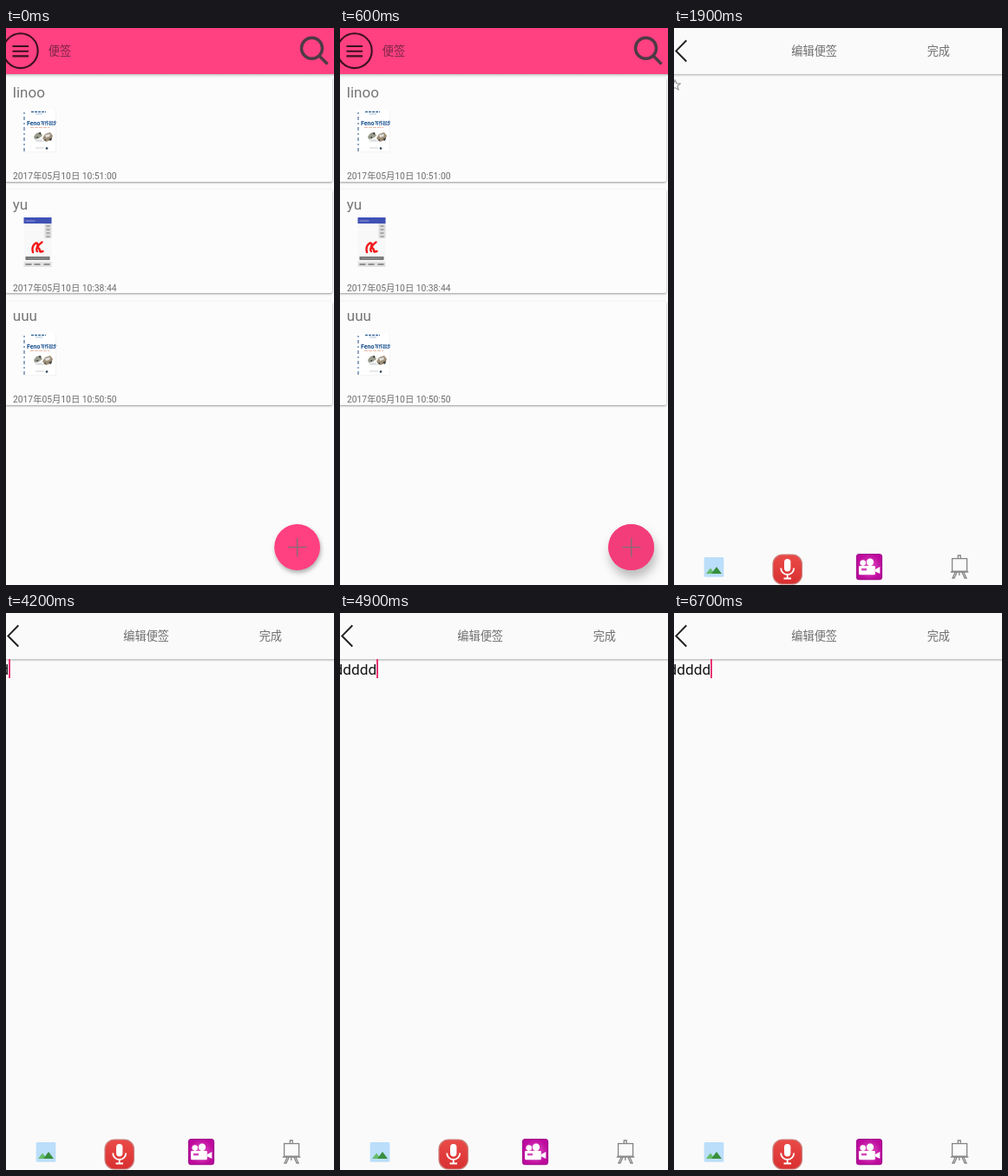
An HTML page that plays this animation: 378x641 px, repeating every 8000 ms.

```html
<!DOCTYPE html>
<html lang="zh-CN">
<head>
<meta charset="utf-8">
<title>便签</title>
<style>
  html, body { margin: 0; width: 100%; height: 100%; overflow: hidden; background: #fafafa; }
  .stage { position: fixed; inset: 0; overflow: clip; contain: strict; }
  svg { position: absolute; left: 0; top: 0; display: block; }
  text, .typed { font-family: Roboto, "Noto Sans CJK SC", "Noto Sans CJK", sans-serif; }
  .title { font-size: 17px; fill: #767676; }
  .date { font-size: 10.3px; fill: #6c6c6c; }
  .bar { font-size: 13.2px; fill: #6e6e6e; }
  .card { fill: #fcfcfc; filter: drop-shadow(0 1px 1px rgba(0, 0, 0, .4)); }

  .fab, .press, .dim, .editor, .hint, .typed { animation: 8s step-end infinite; }
  .fab { animation-name: lift; }
  .press { animation-name: press; }
  .dim { animation-name: dim; }
  .editor { position: absolute; left: 0; top: 0; width: 378px; height: 641px;
    overflow: hidden; background: #fafafa; animation-name: enter; }
  .hint { animation-name: hint; }
  .typed { position: absolute; left: 0; top: 53px; height: 22px; overflow: hidden;
    border-right: 2px solid #e93574; color: #161616; font-size: 17.25px;
    line-height: 24px; white-space: nowrap; animation-name: type, blink; }
  .typed span { margin-left: -6.4px; }

  @keyframes lift {
    0% { filter: drop-shadow(1px 3px 2.5px rgba(0, 0, 0, .3)); }
    6.25% { filter: drop-shadow(1px 5px 4px rgba(0, 0, 0, .28)); }
    7.5%, 100% { filter: drop-shadow(2px 8px 6px rgba(0, 0, 0, .26)); }
  }
  @keyframes press {
    0% { opacity: 0; }
    6.25% { opacity: .5; }
    7.5%, 100% { opacity: 1; }
  }
  @keyframes dim {
    0% { opacity: 0; }
    22.5%, 100% { opacity: .09; }
  }
  @keyframes enter {
    0% { opacity: 0; transform: translateY(14px); }
    22.5% { opacity: .9; transform: translateY(14px); }
    23.75%, 100% { opacity: 1; transform: none; }
  }
  @keyframes hint {
    0% { opacity: 1; }
    52.5%, 100% { opacity: 0; }
  }
  @keyframes type {
    0% { width: 0; visibility: hidden; }
    52.5% { width: 3px; visibility: visible; }
    55% { width: 13px; visibility: visible; }
    56.25% { width: 23px; visibility: visible; }
    58.75% { width: 32px; visibility: visible; }
    61.25%, 100% { width: 42px; visibility: visible; }
  }
  @keyframes blink {
    0%, 73.75%, 83.75%, 100% { border-color: #e93574; }
    66.25%, 78.75% { border-color: transparent; }
  }
</style>
</head>
<body>
<div class="stage">
<svg width="378" height="641" viewBox="0 0 378 641">
  <defs>
    <g id="book">
      <rect width="38" height="49" fill="#fff"/>
      <path d="M1 3V48" stroke="#6484a8" stroke-width="1.4" stroke-dasharray="2 3 4 3"/>
      <path d="M9 2.5H26" stroke="#3f6c9c" stroke-width="1.4" stroke-dasharray="3 1"/>
      <path d="M14 5H22" stroke="#9db6d2" stroke-width=".8"/>
      <g fill="#174f8c" font-weight="700">
        <text x="4" y="17.5" font-size="7">Feno</text>
        <text x="20" y="16.8" font-size="4.7">写作起步</text>
      </g>
      <path d="M8 20.5H30" stroke="#e9b9a8" stroke-width="1" stroke-dasharray="4 1"/>
      <path d="M12 31l3-4 5-1 2 4-4 3-5 1z" fill="#9a9c8e"/>
      <path d="M22 33l3-5 6-2 3 4-2 5-6 2z" fill="#a18f78"/>
      <path d="M13 34h8l3 3h-9zM25 29l6-1-1 3-4 1z" fill="#dfe2e2"/>
      <path d="M17 27l3-1v3zM29 34l4-2-1 4zM14 32l3-1v2zM23 35l3-1v2z" fill="#3a4240"/>
      <path d="M14 44H24" stroke="#c9cdd2" stroke-width=".9"/>
      <circle cx="27" cy="44.5" r="1.3" fill="#2b3f5c"/>
      <path d="M37.5 0V49M0 48.7H38" stroke="#ececec" stroke-width=".6"/>
    </g>
    <g id="screen">
      <rect width="32" height="57" fill="#f8f8f8"/>
      <rect width="32" height="7" fill="#3f51b5"/>
      <path d="M2 4H13" stroke="#8f9ad6" stroke-width="1"/>
      <rect x="24" y="7" width="8" height="17" fill="#dcdcdc"/>
      <path d="M26 10h4M26 14h4M26 18h4M26 22h4" stroke="#777" stroke-width="1.1"/>
      <path d="M10.5 40Q8.5 33 14 29.5Q17 29 15.5 34Q14 38 15.5 39M21 28.5Q16 32 16 35Q18 35 19 39.5L22 39" fill="none"
        stroke="#f01818" stroke-width="2.4" stroke-linecap="round" stroke-linejoin="round"/>
      <rect x="2" y="45" width="28" height="4" fill="#777"/>
      <path d="M5 47H27" stroke="#aaa" stroke-width=".8" stroke-dasharray="2 1"/>
      <rect y="51" width="32" height="6" fill="#e2e2e2"/>
      <path d="M2 54h7m3 0h7m4 0h7" stroke="#777" stroke-width="1.3"/>
    </g>
    <linearGradient id="shade" x2="0" y2="1">
      <stop stop-color="#bdbdbd"/><stop offset="1" stop-color="#fafafa"/>
    </linearGradient>
    <linearGradient id="red" x2="0" y2="1">
      <stop stop-color="#ea4b48"/><stop offset="1" stop-color="#d92f30"/>
    </linearGradient>
    <radialGradient id="magenta">
      <stop stop-color="#e355c6"/><stop offset="1" stop-color="#bd0a9d"/>
    </radialGradient>
  </defs>

  <rect width="378" height="641" fill="#fbfbfb"/>
  <rect width="378" height="53" fill="#ff4081"/>
  <rect y="53" width="378" height="3" fill="url(#shade)"/>
  <g fill="none" stroke="#38111f" stroke-width="2.1">
    <circle cx="16.8" cy="26.2" r="19.9"/>
    <path d="M7.5 21H26M7.5 26.7H26M7.5 32.4H26"/>
  </g>
  <text class="bar" x="48.8" y="31" style="fill:#7a2545">便签</text>
  <g fill="none" stroke="#4c3b45" stroke-width="3.4">
    <circle cx="352.5" cy="23.3" r="12"/>
    <path d="M361 32L370.5 41.5"/>
  </g>

  <rect class="card" x="-1" y="57" width="377" height="120" rx="2"/>
  <text class="title" x="7.8" y="80">linoo</text>
  <use href="#book" x="20" y="94"/>
  <text class="date" x="8" y="174">2017年05月10日 10:51:00</text>

  <rect class="card" x="-1" y="186" width="377" height="119" rx="2"/>
  <text class="title" x="7.8" y="208.5">yu</text>
  <use href="#screen" x="20.5" y="218"/>
  <text class="date" x="8" y="302.5">2017年05月10日 10:38:44</text>

  <rect class="card" x="-1" y="315" width="377" height="119" rx="2"/>
  <text class="title" x="7.8" y="337">uuu</text>
  <use href="#book" x="20" y="351"/>
  <text class="date" x="8" y="431">2017年05月10日 10:50:50</text>

  <g class="fab">
    <circle cx="335.6" cy="597.5" r="26.4" fill="#ff4081"/>
    <circle class="press" cx="335.6" cy="597.5" r="26.4" fill="#f33d7b"/>
    <path d="M325 597.5H346.5M335.7 587V608.5" stroke="#8f6876" stroke-width="1.6"/>
  </g>
  <rect class="dim" width="378" height="641"/>
</svg>

<div class="editor">
  <svg width="378" height="641" viewBox="0 0 378 641">
    <rect y="53" width="378" height="3" fill="url(#shade)"/>
    <path d="M14.3 14.3L2.4 26.4L14.3 38.5" fill="none" stroke="#222" stroke-width="2"/>
    <text class="bar" x="135.3" y="31.3">编辑便签</text>
    <text class="bar" x="291.7" y="31.3">完成</text>
    <path class="hint" d="M1.3 59.5L2.9 64H7.6L3.9 66.8L5.3 71.3L1.3 68.6L-2.7 71.3L-1.3 66.8L-5 64H-.3Z"
      fill="none" stroke="#777" stroke-width=".9"/>

    <rect x="34.7" y="609" width="22.6" height="22.8" rx="1.5" fill="#bbdefb"/>
    <path d="M37 628L42 621.5L47 628Z" fill="#66bb6a"/>
    <path d="M43 628L49 620L55 628Z" fill="#388e3c"/>

    <rect x="114" y="606" width="33.5" height="34" rx="11" fill="url(#red)" stroke="#c9827f" stroke-width="1.2"/>
    <rect x="127" y="611" width="7.4" height="14.5" rx="3.7" fill="#fff"/>
    <path d="M123.2 621.5a7.5 7.5 0 0 0 15 0M130.7 629V633.5M126.5 633.5H135" fill="none" stroke="#fff" stroke-width="1.8"/>

    <rect x="210.5" y="605.5" width="29" height="29.2" rx="3" fill="url(#magenta)" stroke="#a3108e" stroke-width="1.2"/>
    <g fill="#fff">
      <circle cx="217.7" cy="615.6" r="3.3"/>
      <circle cx="226" cy="614.8" r="4.2"/>
      <rect x="213" y="619" width="18.8" height="10.3" rx="1.2"/>
      <path d="M232 623L237.3 620V628L232 625.5Z"/>
    </g>
    <rect x="216" y="621.8" width="6" height="2.6" fill="#d44ab8"/>

    <g fill="none" stroke="#858585" stroke-width="1.3">
      <rect x="320.6" y="610.6" width="17" height="14.6"/>
      <path d="M327.3 610V607H330.2V610M318.8 626H339.3M324 626.5L321 633H323L326 626.5M332 626.5L335 633H337L334 626.5M328.8 626V630"/>
    </g>
  </svg>
  <div class="typed"><span>ddddd</span></div>
</div>
</div>
</body>
</html>
```
